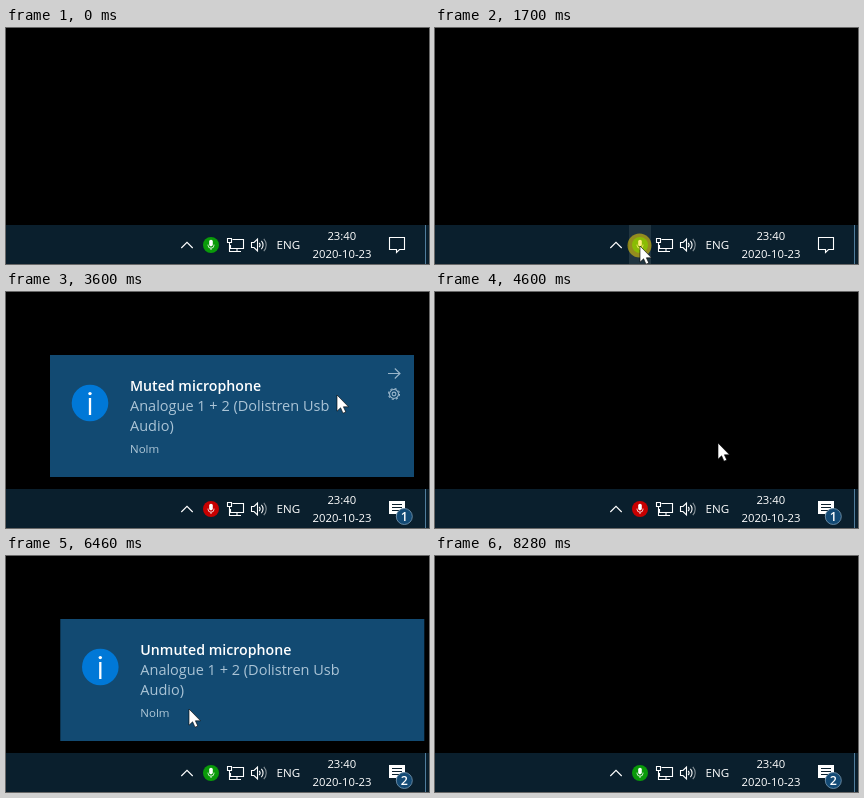
Animation of 423 by 236 pixels, one loop 8450 ms. Source, as an HTML page:

```html
<!DOCTYPE html>
<html lang="en">
<head>
<meta charset="utf-8">
<title>Microphone mute toggle</title>
<style>
  html, body { margin: 0; width: 100%; height: 100%; overflow: hidden; background: #000; }
  svg { display: block; width: 100%; height: 100%; }
  text { font-family: "Open Sans", "Noto Sans", sans-serif; fill: #fff; }
  .clock { font-size: 11.3px; font-weight: 500; text-anchor: middle; }
  .lang { font-size: 11.6px; font-weight: 500; }
  .count { font-size: 12.5px; font-weight: 600; text-anchor: middle; }
  .title { font-size: 14.2px; font-weight: 600; }
  .body { font-size: 14.5px; fill: #abc4d6; }
  .app { font-size: 11.5px; fill: #b0c8d8; }
  .line { fill: none; stroke: #fff; stroke-width: 1.1; }
  .tool { fill: none; stroke: #9ab6ca; stroke-width: 1.1; }
</style>
</head>
<body>
<svg viewBox="0 0 423 236">
  <rect width="423" height="236"/>

  <g id="bar">
    <rect y="197" width="423" height="39" fill="#0a1f2d"/>
    <rect id="hover" x="194" y="197" width="22" height="39" fill="#213541"/>
    <path d="M419.5 197V236" stroke="#4f7c9c"/>
    <path class="line" d="M175.3 220L181 214.3L186.7 220"/>

    <circle id="mic" cx="205" cy="217" r="8"/>
    <rect x="203.2" y="211.8" width="3.6" height="6.6" rx="1.8" fill="#fff"/>
    <path class="line" style="stroke-width:.8" d="M202 216.6v.6a3 3 0 0 0 6 0v-.6M205 220.2V222"/>

    <path class="line" d="M226.5 211.5H237.5V220.5H224.5V217M231 220.5V223.5M227 223.5H235"/>
    <path class="line" d="M221.5 210.5H225.5V214.5H221.5ZM223.5 214.5V223.5H227"/>

    <path class="line" d="M245.5 214.5H248L251.5 211V223L248 219.5H245.5Z"/>
    <path class="line" d="M253.2 214.8a3.4 3.4 0 0 1 0 4.4M255.4 212.8a6.2 6.2 0 0 1 0 8.4"/>
    <path class="line" opacity=".5" d="M257.8 210.8a9.2 9.2 0 0 1 0 12.4"/>

    <text class="lang" x="270.6" y="221">ENG</text>
    <text class="clock" x="335.8" y="212">23:40</text>
    <text class="clock" x="336" y="230">2020-10-23</text>

    <path id="bell" class="line" d="M383.5 209.5H398.5V221.5H393.5L390.5 224.5V221.5H383.5Z"/>
    <g id="badge">
      <path d="M383 209H399V222H393.5L390 225.5V222H383Z" fill="#fff"/>
      <path d="M386 212.5H396M386 215.5H396M386 218.5H393" stroke="#0a1f2d"/>
      <circle cx="398.3" cy="224.5" r="8" fill="#134a75" stroke="#6e8ea6" stroke-width=".9"/>
      <text id="count" class="count" x="398.3" y="229"></text>
    </g>
  </g>

  <g id="toast">
    <rect width="364" height="122" fill="#124a72"/>
    <circle cx="40" cy="48" r="18.3" fill="#0078d7"/>
    <circle cx="40" cy="38.6" r="1.7" fill="#fff"/>
    <path d="M40 43V60" stroke="#fff" stroke-width="2.3"/>
    <text id="title" class="title" x="80" y="36"></text>
    <text class="body" x="80" y="56">Analogue 1 + 2 (Dolistren Usb</text>
    <text class="body" x="80" y="76">Audio)</text>
    <text class="app" x="80" y="98">Nolm</text>
    <g id="tools">
      <path class="tool" d="M338 18.5H350M344.8 13.5L350 18.5L344.8 23.5"/>
      <g transform="translate(344 39)">
        <circle class="tool" r="4.5"/>
        <circle class="tool" r="1.9"/>
        <circle class="tool" r="5.5" stroke-dasharray="2.1 2.22"/>
      </g>
    </g>
  </g>

  <circle id="press" r="12" fill="#ffdc00" fill-opacity=".52"/>
  <path id="cursor" d="M0 -1V15.2L3.6 11.8L6 17.2L8.8 16L6.4 10.8H11.5Z" fill="#fff" stroke="#000" stroke-width=".6"/>
</svg>

<script>
const LOOP = 8450, TICK = 10;

// Pointer stops: time, x, y
const PATH = [
  [360, -14, 214], [1020, 205, 219], [1840, 205, 219], [2320, 92, 121],
  [2490, 92, 121], [2750, 164, 130], [3600, 331, 104], [3860, 387, 81],
  [4180, 387, 81], [4600, 283, 152], [4990, 205, 219], [5580, 205, 219],
  [5850, 95, 145], [6050, 95, 145], [6460, 183, 154], [6890, 295, 125],
  [7220, 387, 81], [7620, 387, 81], [8280, -14, 212]
];
const PRESSES = [[1700, 1800], [3900, 4000], [5220, 5320], [7480, 7580]];
const TOASTS = [
  { title: "Muted microphone", enter: 2742.5, leave: 4000 },
  { title: "Unmuted microphone", enter: 6193, leave: 7600 }
];
const ENTER_MS = 500, LEAVE_MS = 300;
const HOME = 44, EDGE = 423;

const el = {};
for (const node of document.querySelectorAll("[id]")) el[node.id] = node;

const clamp = v => Math.max(0, Math.min(1, v));
const within = (t, a, b) => t >= a && t < b;
const show = (node, on) => node.setAttribute("visibility", on ? "visible" : "hidden");
const place = (node, x, y) => node.setAttribute("transform", `translate(${x} ${y})`);

const bez = (s, a, b) => 3 * (1 - s) ** 2 * s * a + 3 * (1 - s) * s * s * b + s ** 3;

// cubic-bezier(.1, .9, .2, 1)
function settle(p) {
  if (p <= 0 || p >= 1) return clamp(p);
  let lo = 0, hi = 1;
  for (let i = 0; i < 24; i++) {
    const mid = (lo + hi) / 2;
    if (bez(mid, .1, .2) < p) lo = mid; else hi = mid;
  }
  return bez(lo, .9, 1);
}

const slope = (i, k) => (PATH[i + 1][k] - PATH[i][k]) / (PATH[i + 1][0] - PATH[i][0]);

// Tangent that never overshoots and rests at turning points
function tangent(i, k) {
  if (i === 0 || i === PATH.length - 1) return 0;
  const a = slope(i - 1, k), b = slope(i, k);
  return a * b > 0 ? 2 * a * b / (a + b) : 0;
}

function pointer(t, k) {
  const last = PATH.length - 1;
  if (t <= PATH[0][0]) return PATH[0][k];
  if (t >= PATH[last][0]) return PATH[last][k];
  const i = PATH.findIndex(p => p[0] > t) - 1;
  const [a, b] = [PATH[i], PATH[i + 1]];
  const d = b[0] - a[0], u = (t - a[0]) / d, v = 1 - u;
  return a[k] * (1 + 2 * u) * v * v + b[k] * u * u * (3 - 2 * u)
    + d * u * v * (tangent(i, k) * v - tangent(i + 1, k) * u);
}

function drawToast(t, x, y) {
  const toast = TOASTS.find(n => within(t, n.enter, n.leave + LEAVE_MS));
  show(el.toast, toast);
  if (!toast) { show(el.tools, false); return; }
  const inward = settle((t - toast.enter) / ENTER_MS);
  const outward = clamp((t - toast.leave) / LEAVE_MS) ** 2;
  const left = EDGE + (HOME - EDGE) * (inward - outward);
  place(el.toast, left, 63);
  el.title.textContent = toast.title;
  const over = x >= left && x < left + 364 && y >= 63 && y < 185;
  show(el.tools, inward === 1 && (over || outward > 0));
}

function draw(t) {
  const x = pointer(t, 1), y = pointer(t, 2);
  place(el.cursor, x, y);
  place(el.press, x - .5, y - 1.5);
  show(el.press, PRESSES.some(p => within(t, ...p)));
  show(el.hover, within(x, 194, 216) && y >= 197);

  el.mic.setAttribute("fill", within(t, 1800, 5320) ? "#c80000" : "#0a9a0a");
  const count = TOASTS.filter(n => t >= n.enter).length;
  show(el.bell, !count);
  show(el.badge, count);
  el.count.textContent = count || "";
  drawToast(t, x, y);
}

const start = performance.now();
function tick() {
  const t = Math.round((performance.now() - start) / TICK) * TICK;
  draw(t % LOOP);
  requestAnimationFrame(tick);
}
tick();
</script>
</body>
</html>
```
